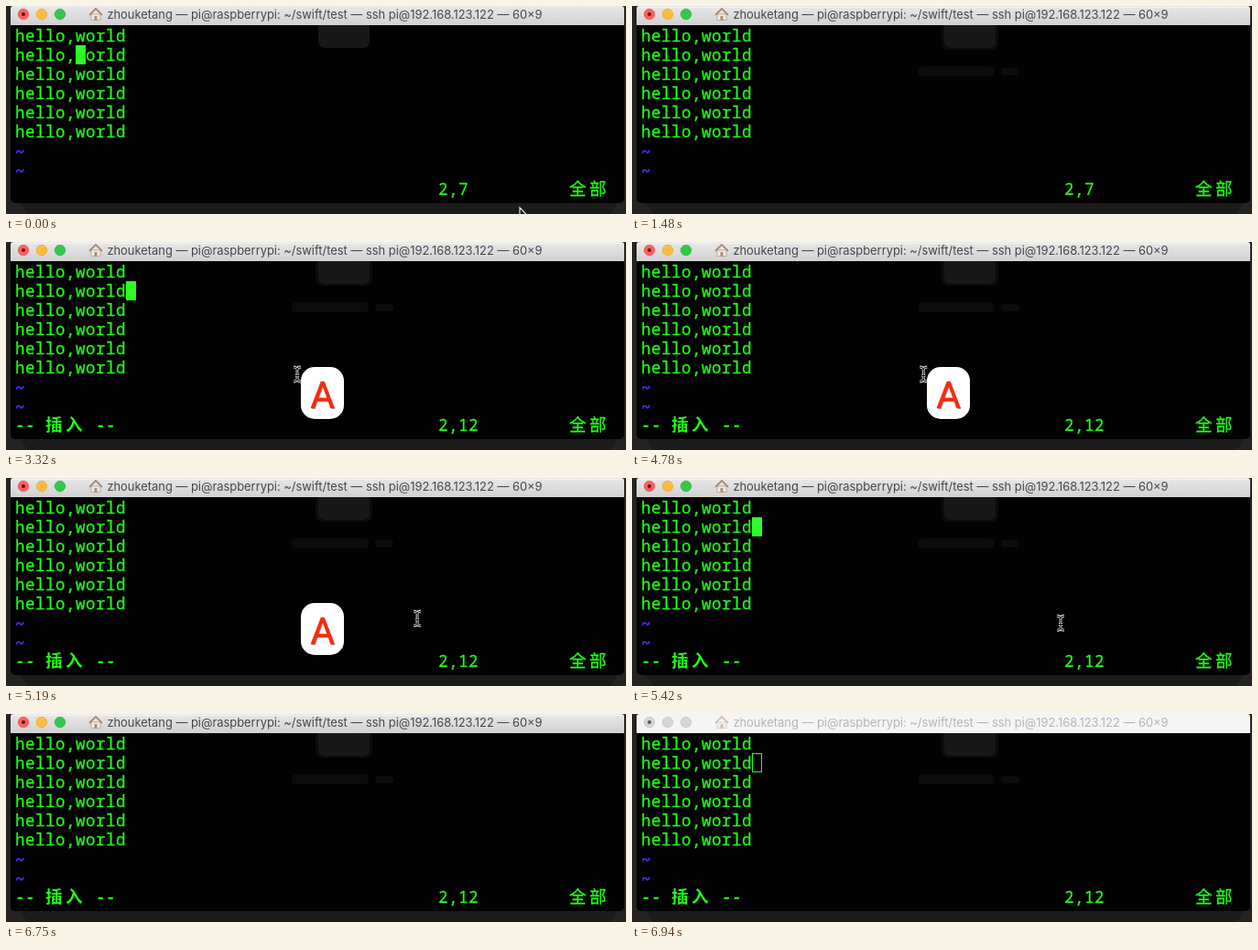
Recreate the animation shown at these times as an HTML page. Size 677 by 228 pixels, loop 7.03 s.

```html
<!DOCTYPE html>
<html lang="zh">
<head>
<meta charset="utf-8">
<title>Terminal</title>
<style>
  html, body { margin: 0; width: 100%; height: 100%; overflow: hidden; background: #1f1e1f; }
  svg { display: block; width: 677px; height: 228px; }
  .mono, .cjk { fill: #20fb16; stroke: #20fb16; stroke-width: .3; }
  .mono { font: 500 17.5px "Noto Sans Mono", "Noto Sans CJK SC", "Noto Sans CJK", monospace; letter-spacing: .5px; white-space: pre; }
  .cjk { font: 500 18.5px "Noto Sans CJK SC", "Noto Sans CJK", sans-serif; }
  .bold { font-weight: 700; stroke: none; }
  .tilde { font-weight: 700; fill: #4a30f5; stroke: #4a30f5; }
  .title { font: 12.9px Inter, Roboto, sans-serif; text-anchor: middle; }
  .key { font: 41px Roboto, Inter, sans-serif; text-anchor: middle; }
</style>
</head>
<body>
<svg viewBox="0 0 677 228">
  <defs>
    <linearGradient id="bar" x1="0" y1="0" x2="0" y2="1">
      <stop offset="0" stop-color="#e9e8e9"/>
      <stop offset="1" stop-color="#d2d1d2"/>
    </linearGradient>
    <path id="beamShape" d="M-4-8Q0-8 0-5Q0-8 4-8M0-5V5M-4 8Q0 8 0 5Q0 8 4 8M-2 1.500H2"/>
  </defs>

  <!-- desktop and window -->
  <rect width="677" height="228" fill="#242223"/>
  <path d="M15 216H668L660 228H24Z" fill="#1b1b1b"/>
  <path d="M5 3H675V211a5 5 0 0 1-5 5H10a5 5 0 0 1-5-5Z" fill="#020202"/>
  <g id="smudge" fill="#0c0c0c">
    <rect x="338" y="18" width="62" height="30" rx="7"/>
    <rect x="312" y="66" width="84" height="11" rx="5"/>
    <rect x="403" y="68" width="20" height="8" rx="4"/>
  </g>
  <path d="M341 21H397V39q0 7-8 7H350q-9 0-9-8Z" fill="#181818"/>

  <!-- title bar -->
  <path id="titleBar" d="M5 21V3q0-3 3-3H672q3 0 3 3V21Z"/>
  <rect id="topRow" x="6" y="1" width="668" height="1" fill="#f3f3f3"/>
  <g id="lights" stroke-width=".6"></g>
  <circle cx="19" cy="9" r="2" id="dot"/>
  <g id="home">
    <path d="M93 9h10v6.500h-10z" fill="#f2ede6" stroke="#a59c92" stroke-width=".8"/>
    <path d="M91 9.800L98 3l7 6.800" fill="none" stroke="#ad8068" stroke-width="1.700"/>
    <path d="M96.500 11h3v4.500h-3z" fill="#b28b6c"/>
  </g>
  <text id="title" class="title" x="348" y="14">zhouketang — pi@raspberrypi: ~/swift/test — ssh pi@192.168.123.122 — 60×9</text>

  <!-- terminal -->
  <rect id="cursor" y="43" width="11" height="21" fill="#30fb29"/>
  <rect id="hollow" x="131.500" y="43.500" width="10" height="20" fill="none" stroke="#30fb29"/>
  <g id="lines"></g>
  <g id="mode">
    <text class="mono bold" x="10" y="207">--</text>
    <text class="cjk bold" x="43 65" y="207">插入</text>
    <text class="mono bold" x="98" y="207">--</text>
  </g>
  <text id="pos" class="mono" x="472" y="207"></text>
  <text class="cjk" x="615 637" y="207">全部</text>

  <!-- pressed key -->
  <g id="key">
    <rect x="322" y="137" width="47" height="57" rx="15" fill="#fff"/>
    <text class="key" x="346.500" y="183" fill="#9a9a9a">A</text>
    <text class="key" x="345.500" y="181.500" fill="#f92a0b" stroke="#f92a0b" stroke-width=".5">A</text>
  </g>

  <!-- mouse -->
  <path id="arrow" d="M0 0V13L3 10.200L5 14.500L7 13.500L5.200 9.500H9Z" fill="#080808" stroke="#f4f4f4" stroke-width="1.100"/>
  <g id="beam" fill="none">
    <use href="#beamShape" stroke="#dedede" stroke-width="2.800"/>
    <use href="#beamShape" stroke="#080808" stroke-width="1"/>
  </g>
</svg>
<script>
const LOOP = 7030, INSERT = 3320, BLUR = 6940;
const BLINKS = [530, 1000, 1480, 1950, 2490, 2960, 4780, 5270, 5760, 6250, 6750];
// time, x, y of the mouse hot spot
const MOUSE = [
  [0, 561, 221], [470, 561, 221], [640, 559, 232], [1599, 544, 232],
  [1600, 540, 220], [1720, 440, 178], [1840, 346, 152], [1950, 318, 145],
  [4780, 318, 145], [4900, 343, 147], [5050, 405, 150], [5190, 449, 154],
  [5420, 468, 159], [5540, 470, 160], [5760, 527, 171], [6000, 530, 172],
  [6110, 565, 187], [6450, 590, 240], [LOOP, 590, 240]
];
const LIGHTS = [[19, "#fc605c", "#de4744"], [39, "#fdbc40", "#dc9c34"], [59, "#34c84a", "#28a638"]];

const SVG = "http://www.w3.org/2000/svg";
const $ = id => document.getElementById(id);
const show = (id, on) => $(id).setAttribute("visibility", on ? "visible" : "hidden");
const set = (node, attrs) => {
  for (const k in attrs) node.setAttribute(k, attrs[k]);
  return node;
};
const add = (parent, tag, attrs) =>
  parent.appendChild(set(document.createElementNS(SVG, tag), attrs));

for (let row = 0; row < 8; row++) {
  const text = row < 6;
  add($("lines"), "text", { class: text ? "mono" : "mono tilde", x: 10, y: (text ? 39 : 40) + 21 * row })
    .textContent = text ? "hello,world" : "~";
}
const lamps = LIGHTS.map(([cx]) => add($("lights"), "circle", { cx, cy: 9, r: 5.8 }));

function mouseAt(t) {
  const i = Math.max(1, MOUSE.findIndex(p => p[0] > t));
  const [t0, x0, y0] = MOUSE[i - 1], [t1, x1, y1] = MOUSE[i];
  const k = (t - t0) / (t1 - t0);
  return [x0 + (x1 - x0) * k, y0 + (y1 - y0) * k];
}

function draw(t) {
  const insert = t >= INSERT, active = t < BLUR;
  const lit = BLINKS.filter(b => b <= t).length % 2 === 0;

  set($("cursor"), { x: insert ? 131 : 76 });
  show("cursor", active && lit);
  show("hollow", !active);
  show("mode", insert);
  $("pos").textContent = insert ? "2,12" : "2,7";

  set($("titleBar"), { fill: active ? "url(#bar)" : "#f6f5f6" });
  set($("title"), { fill: active ? "#474647" : "#b5b4b5" });
  set($("dot"), { fill: active ? "#6b0d0a" : "#555" });
  set($("home"), { opacity: active ? 1 : 0.5 });
  lamps.forEach((lamp, i) => set(lamp, {
    fill: active ? LIGHTS[i][1] : "#d6d5d6",
    stroke: active ? LIGHTS[i][2] : "#bfbebf"
  }));
  show("topRow", t >= 60);
  show("smudge", t >= 60);

  show("key", t >= 3260 && t < 5400);
  set($("key"), { opacity: Math.min(1, Math.max(0, (5400 - t) / 160)) });

  const [x, y] = mouseAt(t), inside = y < 216;
  const at = { transform: `translate(${x.toFixed(2)} ${y.toFixed(2)})` };
  set($("arrow"), at);
  set($("beam"), at);
  show("arrow", !inside);
  show("beam", inside);
}

const start = performance.now();
function tick() {
  draw((performance.now() - start) % LOOP);
  requestAnimationFrame(tick);
}
tick();
</script>
</body>
</html>
```
